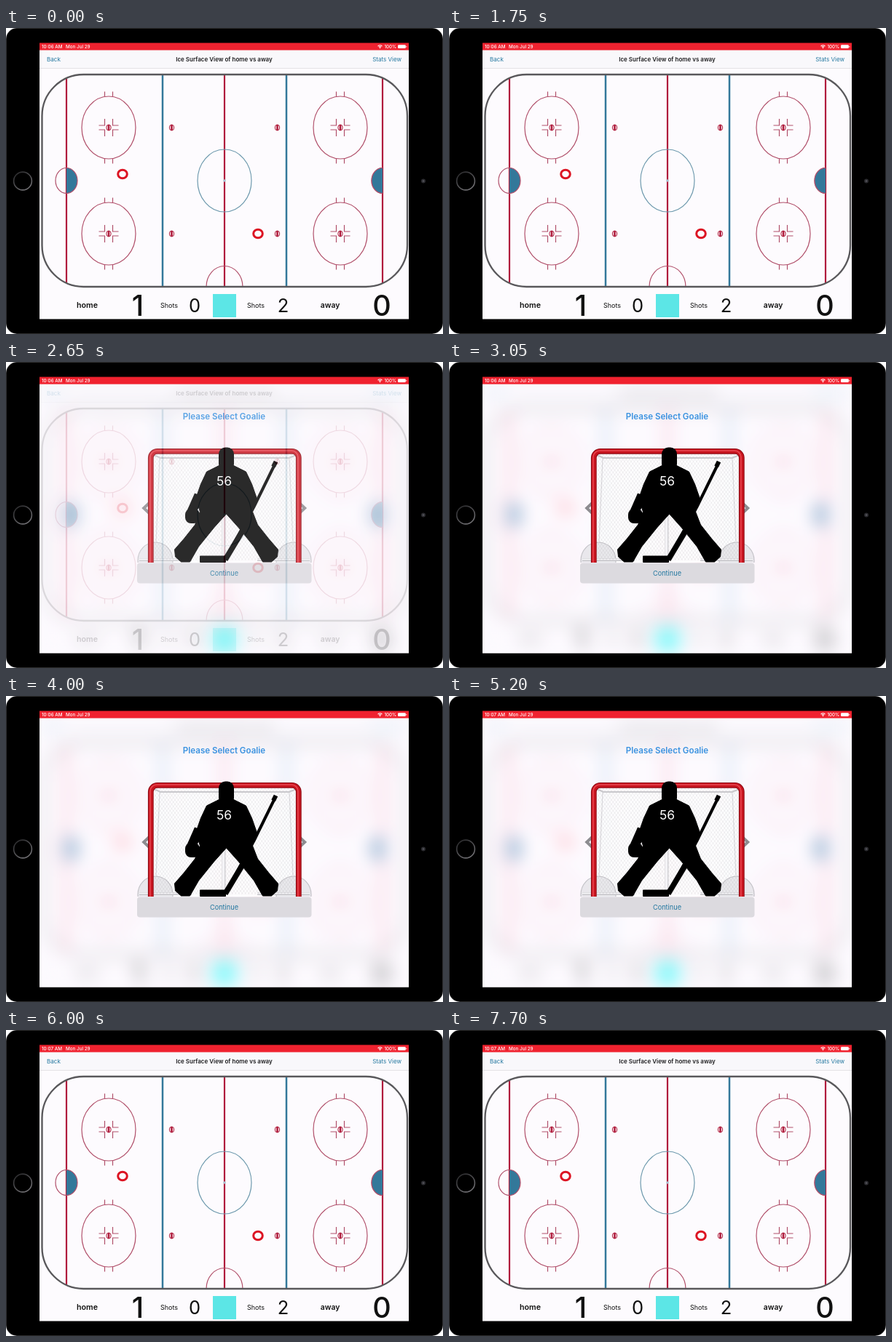
An HTML page with a canvas that plays this animation: 600x421 px, repeating every 7.75 s.

```html
<!DOCTYPE html>
<html lang="en">
<head>
<meta charset="utf-8">
<title>Ice surface view</title>
<style>
html, body { margin: 0; width: 100%; height: 100%; overflow: hidden; background: #fff; }
canvas { display: block; width: 600px; height: 421px; }
</style>
</head>
<body>
<canvas id="stage"></canvas>
<script>
const W = 600, H = 421, LOOP = 7750, TAU = Math.PI * 2;
const LEFT = 46, WIDE = 507, TOP = 20.5, NAV = 30, FOOT = 400.5;
const MID = 300, MIDY = 210, DOT = 73; // rink centre, face-off rows at MIDY ± DOT
const RED = '#b01c3c', ROSE = '#b1506b', BLUE = '#33789a', LINK = '#2478a0', PAPER = '#fdfbfe', INK = '#111';
const SIDES = [-1, 1];
const dpr = window.devicePixelRatio || 1;

function setup(canvas) {
  canvas.width = W * dpr;
  canvas.height = H * dpr;
  const c = canvas.getContext('2d');
  c.scale(dpr, dpr);
  return c;
}
const layer = () => setup(document.createElement('canvas'));

function text(c, str, x, y, size, color, weight = 400, align = 'center') {
  c.font = `${weight} ${size}px Inter, "Liberation Sans", sans-serif`;
  c.textAlign = align;
  c.fillStyle = color;
  c.fillText(str, x, y);
}

function stroke(c, color, width) {
  c.strokeStyle = color;
  c.lineWidth = width;
  c.stroke();
}

function path(c, pts) {
  c.beginPath();
  pts.forEach(([x, y]) => c.lineTo(x, y));
}

function line(c, pts, color, width) {
  path(c, pts);
  stroke(c, color, width);
}

function oval(c, x, y, rx, ry, color, width, from = 0, to = TAU) {
  c.beginPath();
  c.ellipse(x, y, rx, ry, 0, from, to);
  stroke(c, color, width);
}

function box(c, x, y, w, h, r, color) {
  c.beginPath();
  c.roundRect(x, y, w, h, r);
  c.fillStyle = color;
  c.fill();
}

function dot(c, x, y, r, color) {
  box(c, x - r, y - r, 2 * r, 2 * r, r, color);
}

function spot(c, x, y) {
  oval(c, x, y, 3.2, 4, RED, 1);
  box(c, x - 1.3, y - 4, 2.6, 8, 0, RED);
}

function faceoff(c, x, y) {
  oval(c, x, y, 37, 43, ROSE, 1.2);
  for (const sx of SIDES) for (const sy of SIDES) {
    const tx = x + sx * 5.5;
    line(c, [[tx, y + sy * 43], [tx, y + sy * 49.5]], ROSE, 1.2);
    line(c, [[tx, y + sy * 12], [tx, y + sy * 3], [x + sx * 13.5, y + sy * 3]], ROSE, 1.2);
  }
  spot(c, x, y);
}

function boards(c) {
  c.beginPath();
  c.roundRect(49.5, 64, 501.5, 292, 57);
}

function drawRink(c) {
  box(c, LEFT, NAV, WIDE, FOOT - NAV, 0, PAPER);
  box(c, LEFT, NAV, WIDE, 25, 0, '#f9f8fb');
  box(c, LEFT, 55, WIDE, 0.7, 0, '#dcdade');
  text(c, 'Back', 56, 45.7, 8.1, LINK, 400, 'left');
  text(c, 'Ice Surface View of home vs away', 299.5, 45.7, 8, '#1c1c1e', 600);
  text(c, 'Stats View', 543, 45.7, 8, LINK, 400, 'right');

  c.save();
  boards(c);
  c.clip();
  const stripe = (x, color, width) => line(c, [[x, 60], [x, 360]], color, width);
  stripe(MID, RED, 2.2);
  for (const s of SIDES) {
    const goal = MID + s * 217;
    stripe(goal, RED, 2.2);
    stripe(MID + s * 85, BLUE, 2.5);
    c.fillStyle = BLUE;
    oval(c, goal, MIDY, 15, 17.5, ROSE, 1.2, TAU / 4, TAU * 3 / 4);
    c.beginPath();
    c.ellipse(goal, MIDY, 15, 17.5, 0, -TAU / 4, TAU / 4, s > 0);
    c.fill();
    stroke(c, ROSE, 1.2);
  }
  oval(c, MID, MIDY, 37, 43, '#6f9aae', 1.2);
  oval(c, MID, 356, 25, 28.5, ROSE, 1.2, Math.PI, TAU);
  c.restore();
  dot(c, MID, MIDY, 1.8, '#a9c4d4');
  for (const sx of SIDES) for (const sy of SIDES) {
    faceoff(c, MID + sx * 159, MIDY + sy * DOT);
    spot(c, MID + sx * 72.5, MIDY + sy * DOT);
  }
  boards(c);
  stroke(c, '#59585b', 2.3);

  oval(c, 160, 201, 6.3, 5.7, '#dc1423', 3);
  oval(c, 346, 283, 6.3, 5.7, '#dc1423', 3);

  text(c, 'home', 111.5, 385.3, 10.7, INK, 600);
  text(c, 'away', 445, 385.3, 10.4, INK, 600);
  text(c, '1', 181, 396, 39.5, INK, 500);
  text(c, '0', 516, 396, 39.5, INK, 500);
  text(c, 'Shots', 224, 385, 9, INK);
  text(c, 'Shots', 343, 385, 9, INK);
  text(c, '0', 259, 391, 25.5, INK);
  text(c, '2', 380.5, 391, 25.5, INK);
  box(c, 284, 366, 32, 32, 0, '#5ce6e6');
}

function drawNet(c) {
  c.save();
  c.beginPath();
  c.rect(180, 110, 240, 166);
  c.clip();
  box(c, 199, 122, 203, 160, 8, 'rgba(255,255,255,.8)');
  for (const s of SIDES) {
    // base of the frame, bulging out past each post
    c.beginPath();
    c.ellipse(MID + s * 95, 273, 24, 25, 0, 0, TAU);
    c.fillStyle = 'rgba(226,225,230,.7)';
    c.fill();
    stroke(c, '#c3c2c7', 1.2);
    line(c, [[MID + s * 45, 272], [MID + s * 117, 272]], '#c6c5ca', 4);
    line(c, [[MID + s * 45, 271.5], [MID + s * 117, 271.5]], '#f6f5f8', 2);
    line(c, [[MID + s * 89, 132], [MID + s * 94, 248]], '#dddce0', 1.2);
  }
  c.save();
  c.beginPath();
  c.rect(203, 127, 195, 146);
  c.clip();
  for (let x = 40; x < 420; x += 4.5) {
    line(c, [[x, 127], [x + 110, 273]], 'rgba(110,108,116,.2)', 0.5);
    line(c, [[x + 150, 127], [x + 40, 273]], 'rgba(110,108,116,.2)', 0.5);
  }
  c.restore();
  line(c, [[203, 128], [212, 132], [389, 132], [398, 128]], '#c9c8cc', 2.2);
  line(c, [[299, 206], [299, 268]], '#d2d1d5', 5);
  line(c, [[298.5, 206], [298.5, 268]], '#f4f3f6', 3);
  // layered strokes shade the round red tube
  for (const [color, width, shift] of [['#8f0c16', 7.8, 0], ['#c9141f', 5.6, 0], ['#e8454f', 1.6, -0.8]]) {
    c.beginPath();
    c.roundRect(198.8 + shift, 122.8 + shift, 203, 200, 9);
    stroke(c, color, width);
  }
  c.restore();
}

function drawGoalie(c) {
  const x = 302.5;
  // right half from neck to crotch, mirrored for the left
  const half = [[9, 142], [27, 151], [35, 168], [42, 188], [36, 206], [43, 224], [58, 243],
    [71, 258], [70, 268], [62, 275], [50, 275], [38, 254], [17, 228], [0, 209]];
  const body = half.map(([d, y]) => [x + d, y]);
  const other = half.map(([d, y]) => [x - d, y]).reverse();
  c.lineJoin = 'round';
  path(c, [...body, ...other]);
  c.fillStyle = '#000';
  c.fill();
  stroke(c, '#000', 1);
  box(c, x - 10.5, 117.5, 21, 32, 9, '#000');
  box(c, 246, 202, 20, 20, 8, '#000');
  line(c, [[265, 183], [254, 208]], '#000', 13);
  line(c, [[370, 139], [340, 200], [299, 275]], '#000', 4);
  line(c, [[325, 232], [301, 272]], '#000', 7.5);
  line(c, [[370.5, 137], [367, 144]], '#000', 6);
  box(c, 266, 266.5, 36, 9.5, 1, '#000');
  text(c, '56', 299.5, 170.3, 17.4, '#fff');
}

function drawModal(c, rink) {
  c.save();
  c.beginPath();
  c.rect(LEFT, NAV, WIDE, FOOT - NAV);
  c.clip();
  box(c, LEFT, NAV, WIDE, FOOT - NAV, 0, PAPER);
  c.filter = `blur(${12 * dpr}px) saturate(1.6)`;
  c.drawImage(rink, 0, 0, W, H);
  c.filter = 'none';
  box(c, LEFT, NAV, WIDE, FOOT - NAV, 0, 'rgba(250,248,252,.45)');
  c.restore();

  text(c, 'Please Select Goalie', 299.5, 78.6, 11.55, '#3a92e0', 600);
  for (const s of SIDES) {
    const tip = 299.7 + s * 110.5;
    line(c, [[tip - s * 10, 191.5], [tip, 201], [tip - s * 10, 210.5]], '#8d8c90', 4);
  }
  drawNet(c);
  drawGoalie(c);
  box(c, 180, 276.5, 239.5, 28, 4, '#dcdadf');
  text(c, 'Continue', 299.5, 294, 9.2, LINK);
}

function drawDevice(c) {
  box(c, 0, 0, W, H, 15, '#38383a');
  box(c, 0.8, 0.8, W - 1.6, H - 1.6, 14, '#000');
  const shine = c.createLinearGradient(15, 198, 31, 223);
  shine.addColorStop(0, '#2a2a2c');
  shine.addColorStop(1, '#77767a');
  oval(c, 23, 210.5, 12.4, 12.4, shine, 1.6);
  dot(c, 573, 210.5, 3, '#2c2c30');
  dot(c, 573, 210.5, 1.2, '#55555c');
}

function drawStatus(c, clock) {
  box(c, LEFT, TOP, WIDE, NAV + .5 - TOP, 0, '#f0222f');
  text(c, clock, 49, 28, 6.3, '#fff', 500, 'left');
  text(c, 'Mon Jul 29', 82, 28, 6.3, '#fff', 500, 'left');
  for (const r of [2.2, 4.2]) oval(c, 513.5, 28, r, r, '#fff', 1.1, -TAU * 3 / 8, -TAU / 8);
  dot(c, 513.5, 27.5, .7, '#fff');
  text(c, '100%', 536, 28, 6.1, '#fff', 500, 'right');
  box(c, 538, 23.2, 10.8, 4.8, 1.3, '#fff');
  box(c, 549.3, 24.7, 1, 1.8, .5, '#fff');
}

const ctx = setup(document.getElementById('stage'));
const device = layer(), rink = layer(), modal = layer();
drawDevice(device);
drawRink(rink);
drawModal(modal, rink.canvas);

function ease(t, start, span) {
  const p = Math.min(1, Math.max(0, (t - start) / span));
  return p * p * (3 - 2 * p);
}

function frame(now) {
  const t = now % LOOP;
  ctx.clearRect(0, 0, W, H);
  ctx.drawImage(device.canvas, 0, 0, W, H);
  ctx.drawImage(rink.canvas, 0, 0, W, H);
  ctx.globalAlpha = ease(t, 2400, 340) - ease(t, 5360, 340);
  ctx.drawImage(modal.canvas, 0, 0, W, H);
  ctx.globalAlpha = 1;
  drawStatus(ctx, t < 4400 ? '10:06 AM' : '10:07 AM');
  requestAnimationFrame(frame);
}
requestAnimationFrame(frame);
</script>
</body>
</html>
```
